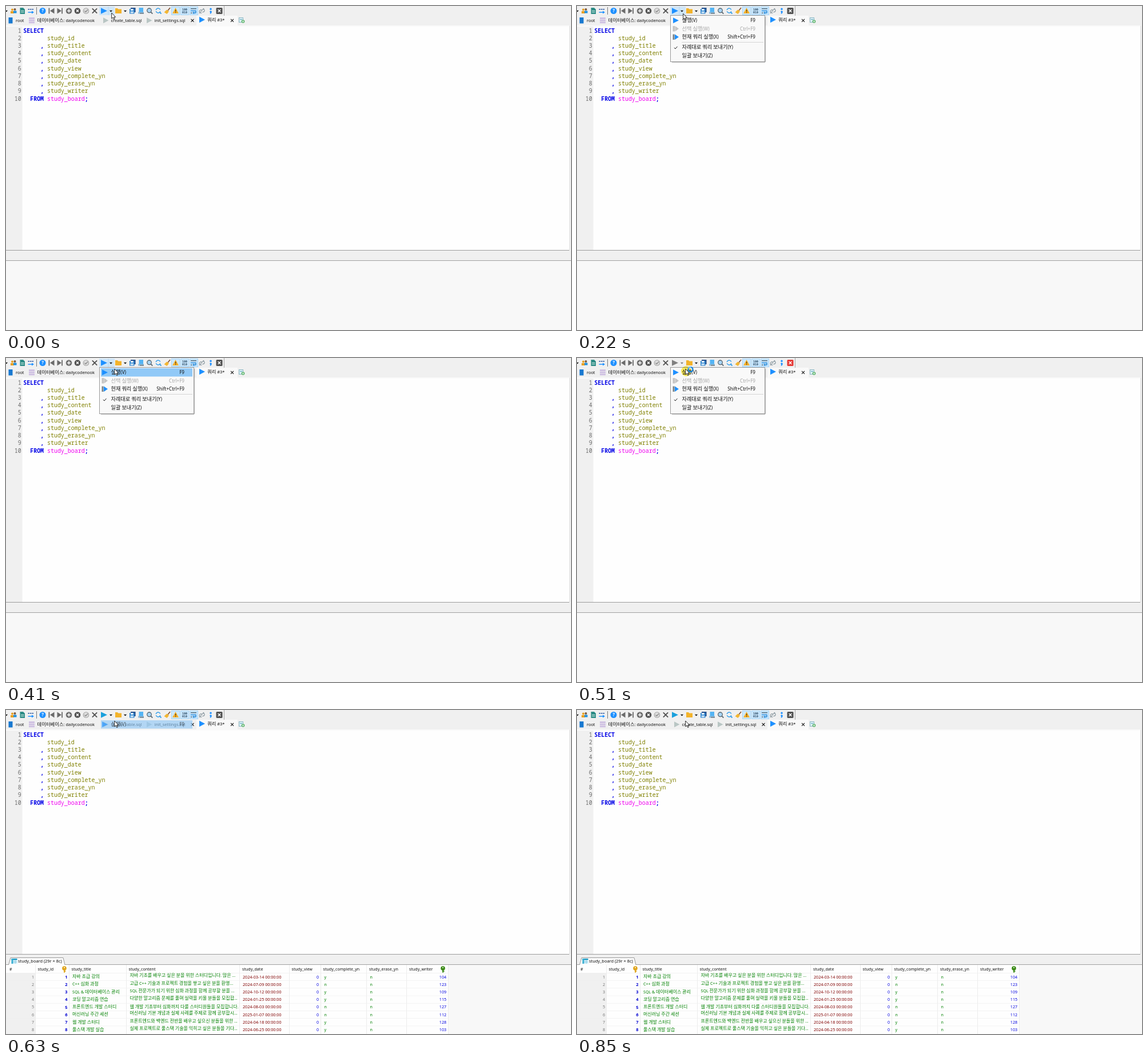
Write an HTML page with a canvas that moves like this. It is 988x567 px and loops after 1.18 s.

```html
<!DOCTYPE html>
<html lang="ko">
<head>
<meta charset="utf-8">
<style>
html, body { margin: 0; width: 100%; height: 100%; overflow: hidden; background: #f0f0f0; }
canvas { display: block; }
</style>
</head>
<body>
<canvas id="stage" width="988" height="567"></canvas>
<script>
const g = document.getElementById('stage').getContext('2d');
const LOOP = 1180;
const SANS = '"Noto Sans", "Noto Sans CJK KR", sans-serif';
const HANGUL = '"Noto Sans CJK KR", "Noto Sans CJK", sans-serif';
const MONO = '"Noto Sans Mono", monospace';
const BLUE = '#1e90ff', GRAY = '#6b6b6b';

function rect(x, y, w, h, color) {
  g.fillStyle = color;
  g.fillRect(x, y, w, h);
}

function frame(x, y, w, h, color) {
  g.strokeStyle = color;
  g.lineWidth = 1;
  g.strokeRect(x + .5, y + .5, w - 1, h - 1);
}

function trace(pts) {
  g.beginPath();
  for (let i = 0; i < pts.length; i += 2) g.lineTo(pts[i], pts[i + 1]);
}

function poly(color, ...pts) {
  trace(pts);
  g.closePath();
  g.fillStyle = color;
  g.fill();
}

function line(color, width, ...pts) {
  trace(pts);
  g.strokeStyle = color;
  g.lineWidth = width;
  g.stroke();
}

function disc(x, y, r, color) {
  g.beginPath();
  g.arc(x, y, r, 0, 7);
  g.fillStyle = color;
  g.fill();
}

function ring(x, y, r, color, width, from = 0, to = 2 * Math.PI) {
  g.beginPath();
  g.arc(x, y, r, from, to);
  g.strokeStyle = color;
  g.lineWidth = width;
  g.stroke();
}

function cross(x, y, r, color, width) {
  line(color, width, x - r, y - r, x + r, y + r);
  line(color, width, x + r, y - r, x - r, y + r);
}

const play = (x, y, w, h, color) => poly(color, x, y - h / 2, x + w, y, x, y + h / 2);
const caret = (x, y, color = '#111') => poly(color, x - 2.6, y - 1.3, x + 2.6, y - 1.3, x, y + 1.6);

// Hangul runs use a slightly larger face than Latin ones; y is the middle of the line.
function text(s, x, y, color = '#111', size = 7.1, right = false, weight = '') {
  const runs = s.match(/[가-힣]+|[^가-힣]+/g).map(run => {
    const font = /[가-힣]/.test(run) ? `${weight} ${size * 1.13}px ${HANGUL}` : `${weight} ${size}px ${SANS}`;
    g.font = font;
    return { run, font, width: g.measureText(run).width };
  });
  if (right) x -= runs.reduce((sum, r) => sum + r.width, 0);
  g.fillStyle = color;
  for (const r of runs) {
    g.font = r.font;
    g.fillText(r.run, x, y + size * .36);
    x += r.width;
  }
}

function mono(s, x, y, color, weight = '', right = false) {
  g.font = `${weight} 9.95px ${MONO}`;
  g.fillStyle = color;
  g.textAlign = right ? 'right' : 'left';
  g.fillText(s, x, y + 3.6);
  g.textAlign = 'left';
}

function toolbar(busy, hover, done) {
  rect(0, 0, 988, 34, '#f0f0f0');
  rect(381, 0, 1, 17, '#a8a8a8');
  rect(53, 2, 1, 13, '#777');
  caret(0.5, 9);

  disc(11, 6.5, 2, '#e8a020'); rect(8, 9, 6, 4, '#e8a020');
  disc(15.5, 6, 2, '#7a5a40'); rect(13, 8.5, 5.5, 4, '#2090e0');
  poly('#2d8c86', 24.5, 3, 30, 3, 33, 6, 33, 14, 24.5, 14);
  rect(26, 8, 5.5, 1, '#d8f0e8'); rect(26, 10.5, 5.5, 1, '#d8f0e8');
  for (let i = 0; i < 3; i++) rect(38.5 + i * 3.5, 5, 2.5, 1.5, '#234f9c');
  line(BLUE, 1.5, 38.5, 11, 46, 11);
  poly(BLUE, 45, 8.5, 49, 11, 45, 13.5);

  disc(64, 8.5, 5.5, BLUE);
  text('?', 62.3, 8.6, '#fff', 8, false, 'bold');
  rect(74.5, 3.5, 1.8, 10, GRAY);
  poly(GRAY, 84.5, 3.5, 77, 8.5, 84.5, 13.5);
  play(89.5, 8.5, 7.5, 10, GRAY);
  rect(97.2, 3.5, 1.8, 10, GRAY);
  disc(110, 8.5, 5.3, '#707070');
  rect(107, 7.8, 6, 1.5, '#fff'); rect(109.25, 5.5, 1.5, 6, '#fff');
  disc(125, 8.5, 5.3, '#505050');
  cross(125, 8.5, 2, '#fff', 1.4);
  disc(140, 8.5, 5.3, '#a4a4a4'); disc(140, 8.5, 4.2, '#dedede');
  line('#888', 1.3, 137.5, 8.5, 139.4, 10.5, 143, 6.5);
  cross(155, 8.5, 4.2, '#505050', 1.8);

  if (hover) {
    rect(163, 1, 27, 15, '#cfe6f8');
    rect(178.5, 1, 1, 15, '#b5d8f3');
  }
  play(166, 8.5, 11, 10.5, busy ? '#808080' : done ? '#1aa0dc' : BLUE);
  caret(183.5, 9, busy ? '#777' : '#111');
  poly('#f3b32b', 191, 4, 195, 4, 196.3, 5.5, 202, 5.5, 202, 13, 191, 13);
  caret(208.5, 9);

  rect(218, 3, 8.5, 8, '#234f8c');
  rect(216, 5, 8.5, 8.5, '#2f86d0');
  rect(218, 5, 4.5, 3, '#e8f2fa'); rect(217.5, 9.5, 5.5, 3, '#cde4f5');
  rect(232.5, 3, 7.5, 8, '#54b4f4');
  rect(231, 10.5, 10, 3, '#8dbcdc'); rect(234, 12, 7, 1.5, '#6d7780');
  disc(250.5, 7.8, 3.8, '#a9d6f7');
  ring(250.5, 7.8, 3.8, '#59666f', 1.3);
  line('#59666f', 1.8, 253.3, 10.6, 256.3, 13.6);
  ring(266, 8, 4, '#2f9cea', 1.4, .3, 2.8);
  ring(266, 8, 4, '#2f9cea', 1.4, 3.4, 5.9);
  line('#2f9cea', 1.8, 268.8, 10.8, 271.5, 13.5);
  line('#8a5a3c', 1.8, 287, 3, 283, 8);
  poly('#f2b632', 281, 6.5, 285, 9.5, 281.5, 14, 276.5, 11);

  for (const x of [289, 305, 321]) {
    rect(x, 1, 15, 15, '#cce8ff');
    frame(x, 1, 15, 15, '#a5d5f8');
  }
  poly('#f5b02a', 296.5, 3, 302, 13, 291, 13);
  rect(296, 6.5, 1.2, 3.3, '#3d3520'); rect(296, 10.8, 1.2, 1.2, '#3d3520');
  g.font = `bold 5px ${MONO}`;
  g.fillStyle = '#34556e';
  g.fillText('100', 308, 7.6);
  g.fillText('010', 308, 13.4);
  rect(323, 4, 10, 1.4, '#456274');
  line('#2689d6', 1.4, 323, 8.5, 332, 8.5, 332, 12, 328.5, 12);
  poly('#2689d6', 329, 9.8, 326, 12, 329, 14.2);
  rect(323, 11.5, 2.5, 1.4, '#456274');

  ring(341, 9.5, 2.8, '#829199', 1.1, 1, 5.3);
  line('#829199', 1.1, 338, 13, 346, 4);
  ring(344.5, 8, 2.6, '#829199', 1.1, -1.8, 2);
  disc(358, 5.3, 1.7, BLUE); disc(358, 10, 1.7, BLUE);
  poly(BLUE, 359.7, 10, 358.8, 13, 356.5, 14, 357.5, 11);
  g.beginPath();
  g.roundRect(367.5, 3, 11, 11, 1.5);
  g.fillStyle = busy ? '#e53935' : '#505050';
  g.fill();
  cross(373, 8.5, 2.4, '#fff', 1.4);
}

function tabs() {
  rect(333, 17, 72, 17, '#f9f9f9');
  rect(4.5, 20, 7, 10.5, '#1878d0');
  text('root', 17, 25.3, '#111', 7.4);
  for (let i = 0; i < 3; i++) rect(40, 20 + i * 3.7, 10, 2.9, '#cfc0e2');
  text('데이터베이스: dailycodenook', 54.5, 25.3, '#111', 7.4);
  play(170, 25.3, 9.5, 10, '#b9c6c4');
  text('create_table.sql', 183.5, 25.3, '#111', 7.35);
  play(246, 25.3, 9.5, 10, '#b9c6c4');
  text('init_settings.sql', 259.5, 25.3, '#111', 7.4);
  cross(326, 25.3, 2.5, '#111', 1.1);
  play(338, 24, 10, 10.5, BLUE);
  text('쿼리 #3*', 352, 24, '#111', 7.4);
  cross(395.5, 25.3, 2.5, '#111', 1.1);
  rect(407.5, 20, 7.5, 9, '#dceff5');
  frame(407, 20, 8, 9, '#8bb6c4');
  rect(409, 23, 4, 1, '#58a3ba');
  disc(414.5, 27, 2.8, '#58b368');
  rect(413, 26.6, 3, .9, '#fff'); rect(414.05, 25.5, .9, 3, '#fff');
}

const FIELDS = ['id', 'title', 'content', 'date', 'view', 'complete_yn', 'erase_yn', 'writer'];

function editor() {
  rect(0, 34, 988, 394, '#f0f0f0');
  rect(0, 34, 985, 2, '#fafafa');
  rect(28.5, 36, 956.5, 391, '#fefefe');
  rect(985, 35, 1, 392, '#e0e0e0');
  rect(0, 427, 985, 1, '#9c9c9c');
  const row = i => 43 + i * 13.22;
  for (let i = 0; i < 10; i++) mono(String(i + 1), 26.8, row(i), '#6c6c6c', '', true);
  mono('SELECT', 30.3, row(0), '#0000e6', 'bold');
  FIELDS.forEach((name, i) => {
    if (i) mono(',', 60.2, row(i + 1), '#0000e6', 'bold');
    mono('study_' + name, 72, row(i + 1), '#808000');
  });
  mono('FROM', 42.2, row(9), '#0000e6', 'bold');
  mono('study_board', 72, row(9), '#f000f0');
  mono(';', 137.7, row(9), '#0000e6', 'bold');
}

const ROWS = [
  ['자바 초급 강의', '자바 기초를 배우고 싶은 분을 위한 스터디입니다. 많은 ...', '2024-03-14', 'y', 104],
  ['C++ 심화 과정', '고급 C++ 기술과 프로젝트 경험을 쌓고 싶은 분을 환영...', '2024-07-09', 'n', 123],
  ['SQL & 데이터베이스 관리', 'SQL 전문가가 되기 위한 심화 과정을 함께 공부할 분을 ...', '2024-10-12', 'y', 109],
  ['코딩 알고리즘 연습', '다양한 알고리즘 문제를 풀며 실력을 키울 분들을 모집합...', '2024-01-25', 'y', 115],
  ['프론트엔드 개발 스터디', '웹 개발 기초부터 심화까지 다룰 스터디원들을 모집합니다.', '2024-08-03', 'n', 127],
  ['머신러닝 주간 세션', '머신러닝 기본 개념과 실제 사례를 주제로 함께 공부합시...', '2025-01-07', 'n', 112],
  ['웹 개발 스터디', '프론트엔드와 백엔드 전반을 배우고 싶으신 분들을 위한 ...', '2024-04-18', 'y', 128],
  ['풀스택 개발 실습', '실제 프로젝트로 풀스택 기술을 익히고 싶은 분들을 기다...', '2024-06-25', 'y', 103]
];
const HEADS = [55.5, 114.5, 214.5, 413, 499.5, 554.5, 635, 705];
const EDGES = [110, 210, 408, 495, 550, 630, 700, 773];

function key(x, color) {
  disc(x, 452, 3.8, color);
  rect(x - 1, 454, 2.2, 5.5, color);
  rect(x, 456.5, 2.8, 1.2, color);
  disc(x, 450.7, 1, '#fff');
}

function results() {
  poly('#fcfcfc', 4.5, 446, 8, 433, 100, 433, 103, 446);
  line('#999', 1, 4.5, 446, 8, 433.5, 100, 433.5, 103, 446);
  rect(9.5, 435, 10, 9, '#d4effa');
  rect(9.5, 435, 10, 2.5, '#1e9bc4'); rect(9.5, 435, 3, 9, '#3aafd2');
  rect(12.5, 440.5, 7, .8, '#79c4dc'); rect(15.7, 437, .8, 7, '#79c4dc');
  text('study_board (29r × 8c)', 21, 439.6, '#111', 7.4);

  rect(0, 446, 774, 121, '#fefefe');
  rect(0, 460, 51, 107, '#f0f0f0');
  text('#', 6, 453.3);
  FIELDS.forEach((name, i) => text('study_' + name, HEADS[i], 453.3));
  for (const x of [51, ...EDGES]) rect(x, 446, 1, 121, '#ececec');
  key(102, '#dfa51c');
  key(764, '#3b8a16');

  ROWS.forEach(([title, content, date, complete, writer], i) => {
    const y = 467 + i * 13.22;
    rect(0, y - 7, 774, .7, '#efefef');
    text(String(i + 1), 49, y, '#777', 7.1, true);
    text(String(i + 1), 107.5, y, '#0000d0', 7.4, true, 'bold');
    text(title, 116, y - .3, '#008000');
    text(content, 216.5, y - (i === 4 ? .3 : 2.2), '#008000');
    text(date + ' 00:00:00', 414, y, '#800000', 7.15);
    text('0', 547, y, '#0000e0', 7.1, true);
    text(complete, 556.5, y, '#008000');
    text(i % 2 || i === 0 || i > 1 ? 'n' : 'n', 636.5, y, '#008000');
    text(String(writer), 770, y, '#0000e0', 7.1, true);
  });
}

function runItem(selected) {
  if (selected) rect(166, 18, 160, 14.5, '#91c9f7');
  play(168, 25.3, 10, 10, BLUE);
  text('실행(V)', 183.5, 25.2, '#111', 8.1);
  text('F9', 312, 25.2, '#111', 8.1, true);
}

function menu(alpha, selected) {
  g.globalAlpha = alpha;
  rect(166, 97, 163, 1.5, '#777');
  rect(328, 19, 1.5, 79, '#777');
  rect(163, 16, 165.5, 81.5, '#f9f9f9');
  frame(163, 16, 166, 82, '#9a9a9a');
  runItem(selected);
  rect(167.5, 35, 3.5, 9.5, '#c4c4c4');
  play(171.5, 39.7, 6.5, 9.5, '#c4c4c4');
  text('선택 실행(W)', 183.5, 39.7, '#a6a6a6', 8.1);
  text('Ctrl+F9', 312, 39.7, '#a6a6a6', 8.1, true);
  rect(167.5, 49.5, 3, 9.5, '#79838a');
  play(171, 54.2, 7, 9.5, BLUE);
  text('현재 쿼리 실행(X)', 183.5, 54.2, '#111', 8.1);
  text('Shift+Ctrl+F9', 312, 54.2, '#111', 8.1, true);
  rect(183, 63, 143, 1, '#d5d5d5');
  line('#222', 1, 170, 72.8, 171.9, 75, 175.5, 70.8);
  text('자례대로 쿼리 보내기(Y)', 183.5, 72.5, '#111', 8.1);
  text('일괄 보내기(Z)', 183.5, 87, '#111', 8.1);
  g.globalAlpha = 1;
}

function glow(x, y) {
  g.globalCompositeOperation = 'multiply';
  disc(x, y, 9, '#fff060');
  g.globalCompositeOperation = 'source-over';
}

function pointer(x, y) {
  g.save();
  g.translate(x, y);
  poly('#fff', 0, 0, 0, 10, 2.3, 8, 4, 11.6, 5.6, 10.9, 4, 7.4, 7, 7.4);
  g.closePath();
  g.strokeStyle = '#111';
  g.lineWidth = .9;
  g.stroke();
  g.restore();
}

const clamp = v => Math.max(0, Math.min(1, v));

function draw(t) {
  const busy = t >= 480 && t < 600;
  const done = t >= 600;
  const glide = clamp((t - 190) / 110);
  const ease = glide * glide * (3 - 2 * glide);
  const x = 184.7 + 5 * ease, y = 12 + 7 * ease;

  toolbar(busy, t < 480, done);
  tabs();
  editor();
  rect(0, 428, 988, 17, '#f0f0f0');
  rect(0, 446, 988, 121, '#f8f8f8');
  rect(0, 445, 988, 1, '#a0a0a0');
  if (done) results();

  if (t >= 30 && t < 210) glow(184, 10);
  if (t >= 60 && t < 560) menu(clamp((t - 60) / 120), t >= 250 && t < 480);
  if (t >= 420 && t < 560) glow(191, 23);

  if (t >= 560 && t < 600) {
    rect(0, 100, 132, 1, '#a0a0a0');
    rect(131.5, 36, 1, 64, '#e6e6e6');
  }
  if (t >= 560 && t < 850) {
    g.globalAlpha = .85 * (850 - t) / 290;
    runItem(true);
    g.globalAlpha = 1;
  }
  pointer(x, y);
  if (t >= 480 && t < 560) {
    ring(198.5, 20, 4, '#1683d8', 2.4);
    ring(198.5, 20, 4, '#7cc4f4', 2.4, 3.6, 5);
  }
}

function tick() {
  draw(performance.now() % LOOP);
  requestAnimationFrame(tick);
}
tick();
</script>
</body>
</html>
```
